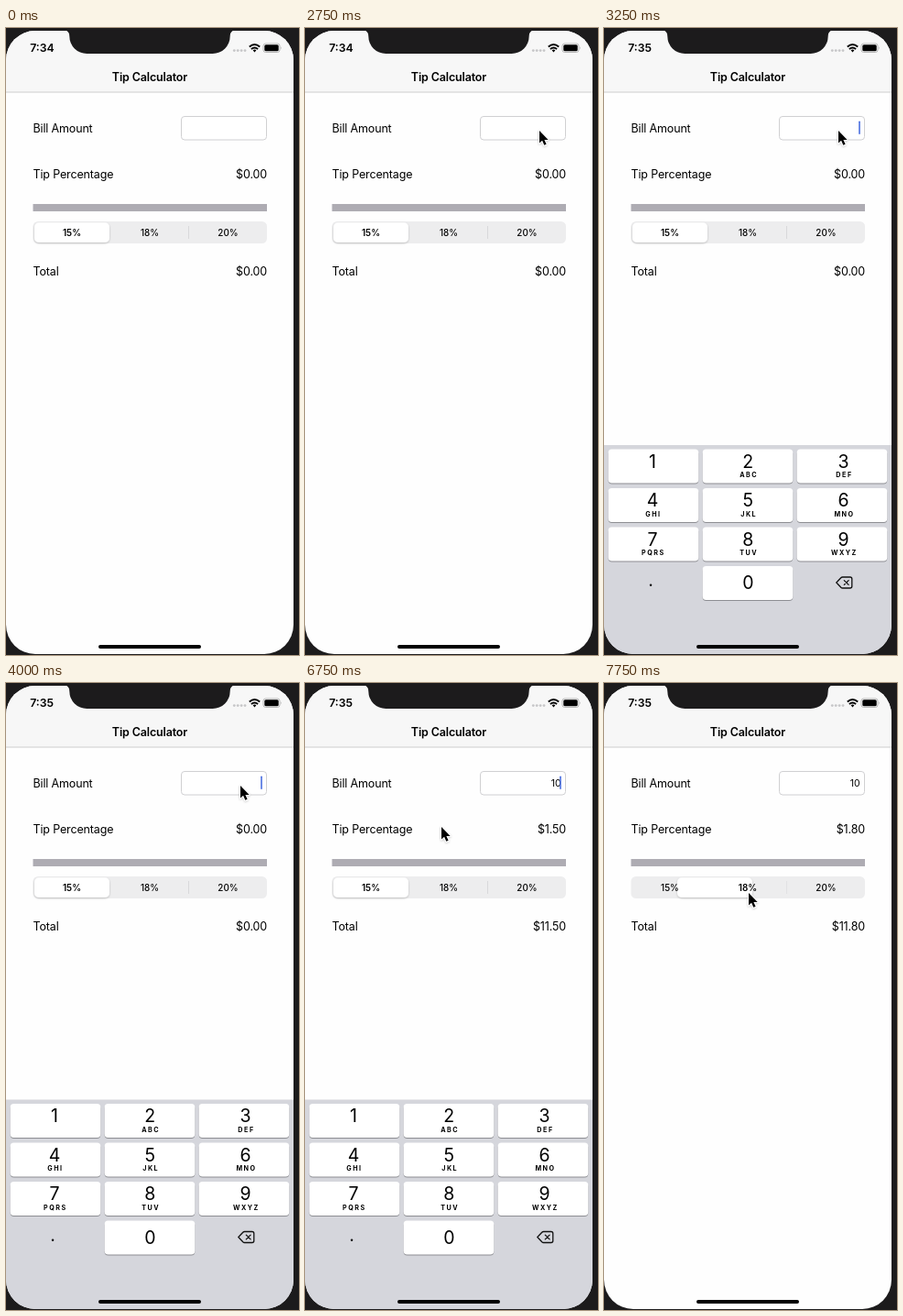
These frames come from a looping animation (320x684 px, 8000 ms). An HTML page:

```html
<!DOCTYPE html>
<html lang="en">
<head>
<meta charset="utf-8">
<title>Tip Calculator</title>
<style>
  html, body { margin: 0; width: 100%; height: 100%; overflow: hidden; background: #1c1b1c; }
  svg { display: block; width: 320px; height: 684px; }
  text { font: 12.5px Inter, sans-serif; letter-spacing: -.012em; fill: #000; }
  .title { font-weight: 600; }
  .clock { font-size: 12.3px; font-weight: 600; letter-spacing: 0; }
  .segment { font-size: 9.9px; font-weight: 500; letter-spacing: 0; }
  .segment.on { font-weight: 600; }
  .bill { font-size: 10.5px; }
  .digit { font-size: 19.5px; letter-spacing: 0; }
  .letters { font-size: 7.2px; font-weight: 700; letter-spacing: 1.5px; }
  .mid { text-anchor: middle; }
  .end { text-anchor: end; }
</style>
</head>
<body>
<svg viewBox="0 0 320 684">
  <defs>
    <clipPath id="screen"><rect y="3" width="314" height="680" rx="32"/></clipPath>
    <filter id="soft" x="-30%" y="-30%" width="160%" height="180%">
      <feDropShadow dx="0" dy="1" stdDeviation="1" flood-opacity=".22"/>
    </filter>
  </defs>
  <rect width="320" height="684" fill="#1c1b1c"/>
  <g clip-path="url(#screen)">
    <rect width="314" height="684" fill="#fefefe"/>
    <rect width="314" height="70" fill="#f7f7f7"/>
    <rect y="69.5" width="314" height="1" fill="#cfcfcf"/>
    <text class="title mid" x="157" y="57.5">Tip Calculator</text>

    <text x="29.5" y="114">Bill Amount</text>
    <rect x="191.5" y="96.5" width="93" height="25.5" rx="3.5" fill="#fff" stroke="#d0d0d2"/>
    <text id="bill" class="bill end" x="279.5" y="113"></text>
    <rect id="caret" x="278.2" y="101.5" width="1.6" height="14.5" rx=".8" fill="#4a6ee0"/>

    <text x="29.5" y="163.5">Tip Percentage</text>
    <text id="tip" class="end" x="285" y="163.5"></text>
    <rect x="29.5" y="192" width="255.5" height="8" fill="#aeacb3"/>

    <rect x="29.5" y="211" width="255.5" height="24" rx="5.5" fill="#ededee"/>
    <rect id="divider" x="199" y="216" width="1" height="14" fill="#d8d8da"/>
    <rect id="pill" x="31" y="212.3" width="82" height="21.7" rx="5" fill="#fff" filter="url(#soft)"/>
    <text class="segment mid" x="72" y="226.7">15%</text>
    <text class="segment mid" x="157" y="226.7">18%</text>
    <text class="segment mid" x="242.5" y="226.7">20%</text>

    <text x="29.5" y="269.5">Total</text>
    <text id="total" class="end" x="285" y="269.5"></text>

    <g id="keyboard">
      <rect y="454.5" width="314" height="240" fill="#d5d6dc"/>
      <text class="digit mid" x="51" y="608.5">.</text>
      <g fill="none" stroke="#111" stroke-width="1.3" stroke-linejoin="round" stroke-linecap="round">
        <path d="M253.8 604.5l5-5.3q.7-.7 1.7-.7h8.3q2 0 2 2v8q0 2-2 2h-8.3q-1 0-1.7-.7z"/>
        <path d="M262.3 602.1l4.8 4.8m0-4.8l-4.8 4.8"/>
      </g>
    </g>
    <rect x="101" y="673" width="112" height="4" rx="2"/>
  </g>

  <path d="M64 2.5Q69.3 3 69.3 9A19 19 0 0 0 88.3 28H225.7A19 19 0 0 0 244.7 9Q244.7 3 250 2.5z" fill="#1c1b1c"/>
  <text id="clock" class="clock" x="26.2" y="26.3"></text>
  <g fill="#c6c6c8">
    <circle cx="249.3" cy="24.6" r="1.4"/><circle cx="253.2" cy="24.6" r="1.4"/>
    <circle cx="257.1" cy="24.6" r="1.4"/><circle cx="261" cy="24.6" r="1.4"/>
  </g>
  <g fill="none" stroke="#000" stroke-width="1.9">
    <path d="M265.8 20.5q5.7-4.9 11.4 0M267.9 23q3.6-3 7.2 0"/>
    <path d="M269.6 24.3q1.9-1.4 3.8 0l-1.9 2.1z" fill="#000" stroke="none"/>
  </g>
  <rect x="281" y="17" width="18" height="9.5" rx="2.5" fill="none" stroke="#aaa" stroke-width=".8"/>
  <rect x="282.3" y="18.3" width="15.4" height="6.9" rx="1.5"/>
  <path d="M300 20.2q1.4 1.5 0 3z" fill="#aaa"/>

  <path id="cursor" d="M0 0V13.6L3.1 10.8L5.3 15.8L7.6 14.8L5.4 9.9H9.7z" filter="url(#soft)"
        stroke="#fff" stroke-width="1.8" paint-order="stroke" stroke-linejoin="round"/>
</svg>
<script>
const $ = id => document.getElementById(id);
const LOOP = 8000, STEP = 250;

const keyLetters = ['', 'ABC', 'DEF', 'GHI', 'JKL', 'MNO', 'PQRS', 'TUV', 'WXYZ', ''];
$('keyboard').innerHTML += keyLetters.map((letters, i) => {
  const col = i === 9 ? 1 : i % 3, row = Math.floor(i / 3);
  const x = 4.6 + col * 103, y = 459 + row * 42.5, mid = 53 + col * 104.3;
  return `<rect x="${x}" y="${y + 1}" width="98.7" height="37" rx="4" fill="#8d8e93"/>
    <rect x="${x}" y="${y}" width="98.7" height="37" rx="4" fill="#fff"/>
    <text class="digit mid" x="${mid}" y="${y + (i === 9 ? 25 : 20)}">${(i + 1) % 10}</text>
    <text class="letters mid" x="${mid + .9}" y="${y + 30.9}">${letters}</text>`;
}).join('');

// Each track is a list of [start time, value]; a value holds until the next one.
const tracks = {
  cursor: [[0, null], [500, [138, 43]], [750, [178, 82]], [1000, [223, 108]], [1250, [234, 104]],
    [1500, [245, 108]], [1750, [256, 112]], [6000, [249, 114]], [6250, [172, 142]],
    [6500, [148, 156]], [6750, [149, 157]], [7250, [153, 194]], [7500, [158, 229]]],
  keyboard: [[0, 240], [3000, 14], [3250, .5], [3500, 0], [7000, 194], [7250, 240]],
  caret: [[0, 0], [3000, 1], [3500, 0], [4000, 1], [5250, 0], [5750, 1], [6250, 0], [6750, 1], [7000, 0]],
  bill: [[0, 0], [4500, 10]],
  rate: [[0, .15], [7750, .18]],
  pill: [[0, 0], [7750, 49]],
  clock: [[0, '7:34'], [3000, '7:35']]
};
const at = (name, t) => tracks[name].findLast(([start]) => start <= t)[1];
const money = n => '$' + n.toFixed(2);
const move = (id, x, y) => $(id).setAttribute('transform', `translate(${x} ${y})`);
const segments = document.querySelectorAll('.segment');

function draw(t) {
  const bill = at('bill', t), rate = at('rate', t), pill = at('pill', t), cursor = at('cursor', t);
  $('clock').textContent = at('clock', t);
  $('bill').textContent = bill || '';
  $('tip').textContent = money(bill * rate);
  $('total').textContent = money(bill * (1 + rate));
  $('caret').style.opacity = at('caret', t);
  $('divider').style.opacity = pill ? .5 : 1;
  segments.forEach((s, i) => s.classList.toggle('on', i === (pill ? 1 : 0)));
  move('pill', pill, 0);
  move('keyboard', 0, at('keyboard', t));
  $('cursor').style.display = cursor ? '' : 'none';
  if (cursor) move('cursor', ...cursor);
}

const start = performance.now();
function tick() {
  const t = (performance.now() - start) % LOOP;
  draw(Math.floor(t / STEP) * STEP);
  requestAnimationFrame(tick);
}
tick();
</script>
</body>
</html>
```
